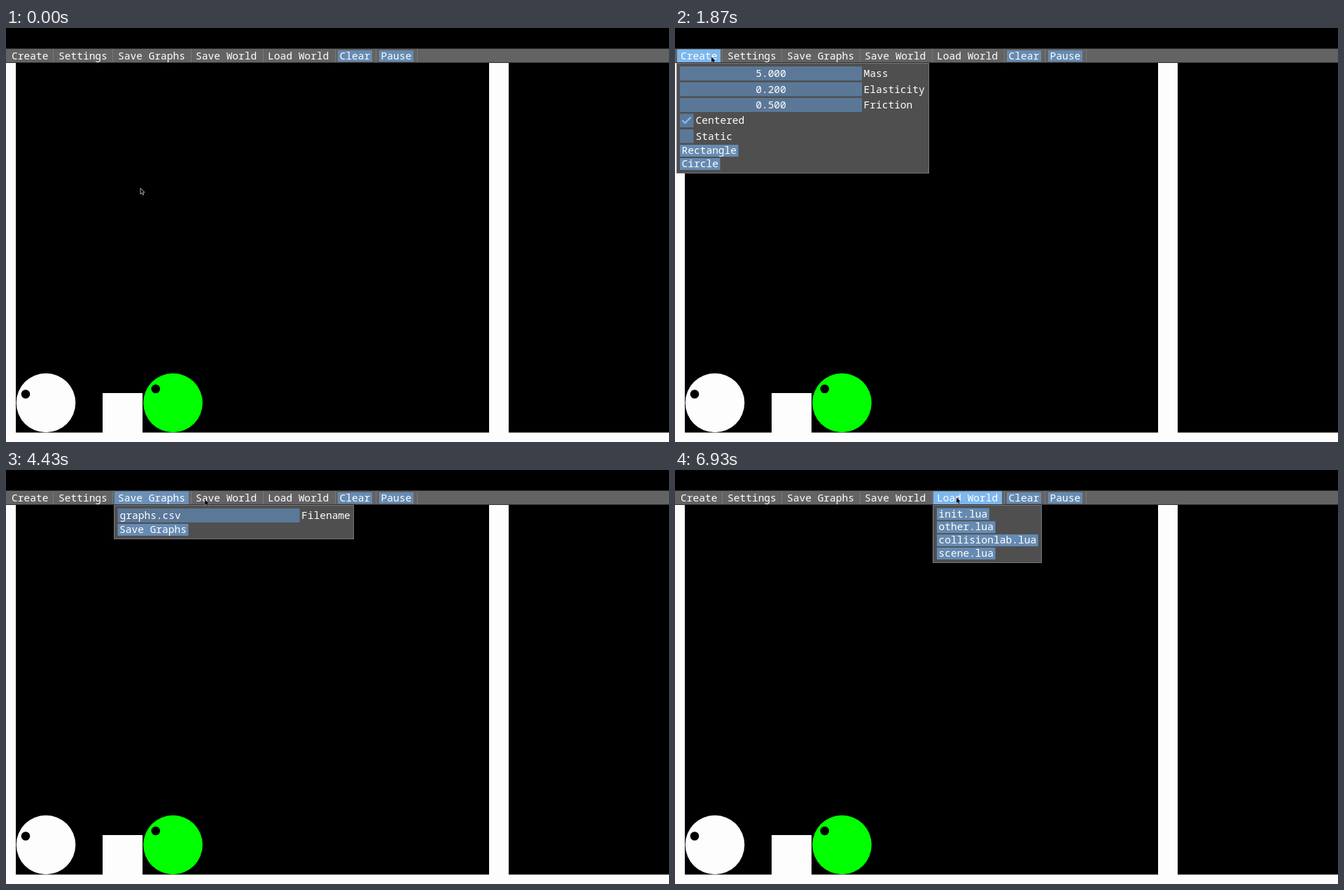
Recreate the animation shown at these times as an HTML page with a canvas. Size 947 by 592 pixels, loop 7060 ms.

```html
<!DOCTYPE html>
<html lang="en">
<head>
<meta charset="utf-8">
<title>Physics sandbox</title>
<style>
html, body { margin: 0; width: 100%; height: 100%; overflow: hidden; background: #000; }
canvas { display: block; }
</style>
</head>
<body>
<canvas id="stage" width="947" height="592"></canvas>
<script>
const ctx = document.getElementById('stage').getContext('2d');
const LOOP = 7060;
const WHITE = '#fdfdfd', BAR = '#636363', PANEL = '#4f4f4f', EDGE = '#777780';
const FIELD = '#5b7898', BUTTON = '#668bb2', HOVER = '#7db7ed', OPEN = '#6b91b9';
const FONT = '14.55px "Noto Sans Mono", "DejaVu Sans Mono", monospace';

// Menu headers: label, left, right, opening time, contents
const menus = [
  ['Create', 3, 65, 1080, createMenu],
  ['Settings', 70, 150, 2360, settingsMenu],
  ['Save Graphs', 155, 261, 3365, () => saveMenu(155, 'graphs.csv', 'Save Graphs', 101)],
  ['Save World', 266, 364, 4465, () => saveMenu(266, 'lua/scene.lua', 'Save World', 93)],
  ['Load World', 369, 467, 5400, loadMenu]
];

// Pointer stops: time, x, y
const path = [
  [0, 192, 229], [630, 102, 102], [1050, 50, 42], [1500, 52, 41], [2200, 52, 41],
  [2520, 100, 41], [3100, 112, 41], [3330, 163, 40], [3600, 205, 41], [4180, 216, 41],
  [4430, 284, 42], [4640, 313, 43], [5130, 316, 44], [5560, 402, 39], [LOOP, 402, 39]
];

function rect(x, y, w, h, color) {
  ctx.fillStyle = color;
  ctx.fillRect(x, y, w, h);
}

function disc(x, y, r, color) {
  ctx.fillStyle = color;
  ctx.beginPath();
  ctx.arc(x, y, r, 0, Math.PI * 2);
  ctx.fill();
}

function text(s, x, y, align = 'left') {
  ctx.font = FONT;
  ctx.textAlign = align;
  ctx.fillStyle = '#fff';
  ctx.fillText(s, x, y);
}

function panel(x, w, h) {
  rect(x, 50, w, h, PANEL);
  ctx.strokeStyle = EDGE;
  ctx.lineWidth = 1;
  ctx.strokeRect(x + .5, 50.5, w - 1, h - 1);
}

function button(s, x, y, w, h = 17) {
  rect(x, y, w, h, BUTTON);
  text(s, x + 2.5, y + 13);
}

function slider(x, y, value, label) {
  rect(x, y, 260, 20, FIELD);
  text(value, x + 130, y + 15, 'center');
  text(label, x + 262.5, y + 15);
}

function checkbox(y, label, on) {
  rect(7, y, 19.5, 19.5, FIELD);
  if (on) {
    ctx.strokeStyle = '#82c0fa';
    ctx.lineWidth = 2.2;
    ctx.beginPath();
    ctx.moveTo(10.5, y + 9.5);
    ctx.lineTo(14.5, y + 13.5);
    ctx.lineTo(22.5, y + 5);
    ctx.stroke();
  }
  text(label, 29.5, y + 14.5);
}

function createMenu() {
  panel(2, 361, 158);
  slider(7, 55, '5.000', 'Mass');
  slider(7, 77.5, '0.200', 'Elasticity');
  slider(7, 100, '0.500', 'Friction');
  checkbox(122.5, 'Centered', true);
  checkbox(145, 'Static', false);
  button('Rectangle', 7, 167, 83.5);
  button('Circle', 7, 186, 57.5);
}

function settingsMenu() {
  panel(69, 405, 75);
  slider(74.5, 55, '0.016', 'Timestep');
  slider(74.5, 77.5, '9.810', 'Gravity');
  slider(74.5, 100, '1', 'Steps Per Frame');
}

function saveMenu(x, file, action, w) {
  panel(x - .5 | 0, 343, 49);
  rect(x + 4.5, 55, 260, 20, FIELD);
  text(file, x + 7.5, 70);
  text('Filename', x + 267, 70);
  button(action, x + 4.5, 77, w);
}

function loadMenu() {
  panel(368, 156, 83);
  ['init.lua', 'other.lua', 'collisionlab.lua', 'scene.lua'].forEach((file, i) =>
    button(file, 374, 54.5 + i * 18.8, file.length * 8.73 + 5));
}

function world() {
  rect(0, 0, 947, 592, '#000');
  rect(0, 50, 14, 542, WHITE);
  rect(690, 50, 28, 542, WHITE);
  rect(0, 578.5, 947, 13.5, WHITE);
  rect(138, 522, 57, 57, WHITE);
  disc(57, 536, 42.3, WHITE);
  disc(28, 523.5, 6.3, '#000');
  disc(238.5, 536, 42.3, '#00ff00');
  disc(213.8, 516, 6.3, '#000');
}

function pointerAt(t) {
  const i = path.findIndex(p => p[0] > t);
  const [t0, x0, y0] = path[i - 1], [t1, x1, y1] = path[i];
  const u = (t - t0) / (t1 - t0), k = u * u * (3 - 2 * u);
  return [x0 + (x1 - x0) * k, y0 + (y1 - y0) * k];
}

function menuBar(t, x, y) {
  rect(0, 29.5, 947, 20, BAR);
  const current = menus.filter(m => t >= m[3]).pop();
  if (current) {
    const [, left, right] = current;
    const over = x >= left && x <= right && y > 30 && y < 50;
    rect(left, 30.5, right - left, 18.5, over ? HOVER : OPEN);
  }
  for (const s of [67, 152, 264, 367, 470, 528, 587]) rect(s, 30, 1, 19, EDGE);
  for (const [label, left] of menus) text(label, left + 5, 45);
  button('Clear', 474, 32, 49, 16);
  button('Pause', 533, 32, 49, 16);
  if (current) current[4]();
}

function pointer(x, y) {
  ctx.beginPath();
  [[0, 0], [0, 8.5], [2, 6.8], [3.4, 9.8], [4.8, 9.2], [3.5, 6.2], [6, 6]]
    .forEach(([dx, dy]) => ctx.lineTo(x + dx, y + dy));
  ctx.closePath();
  ctx.fillStyle = '#000';
  ctx.fill();
  ctx.lineWidth = .8;
  ctx.strokeStyle = y > 50 ? '#d8d8d8' : 'rgba(225,225,225,.4)';
  ctx.stroke();
}

function draw() {
  const t = performance.now() % LOOP;
  const [x, y] = pointerAt(t);
  world();
  menuBar(t, x, y);
  pointer(x, y);
  requestAnimationFrame(draw);
}
draw();
</script>
</body>
</html>
```
